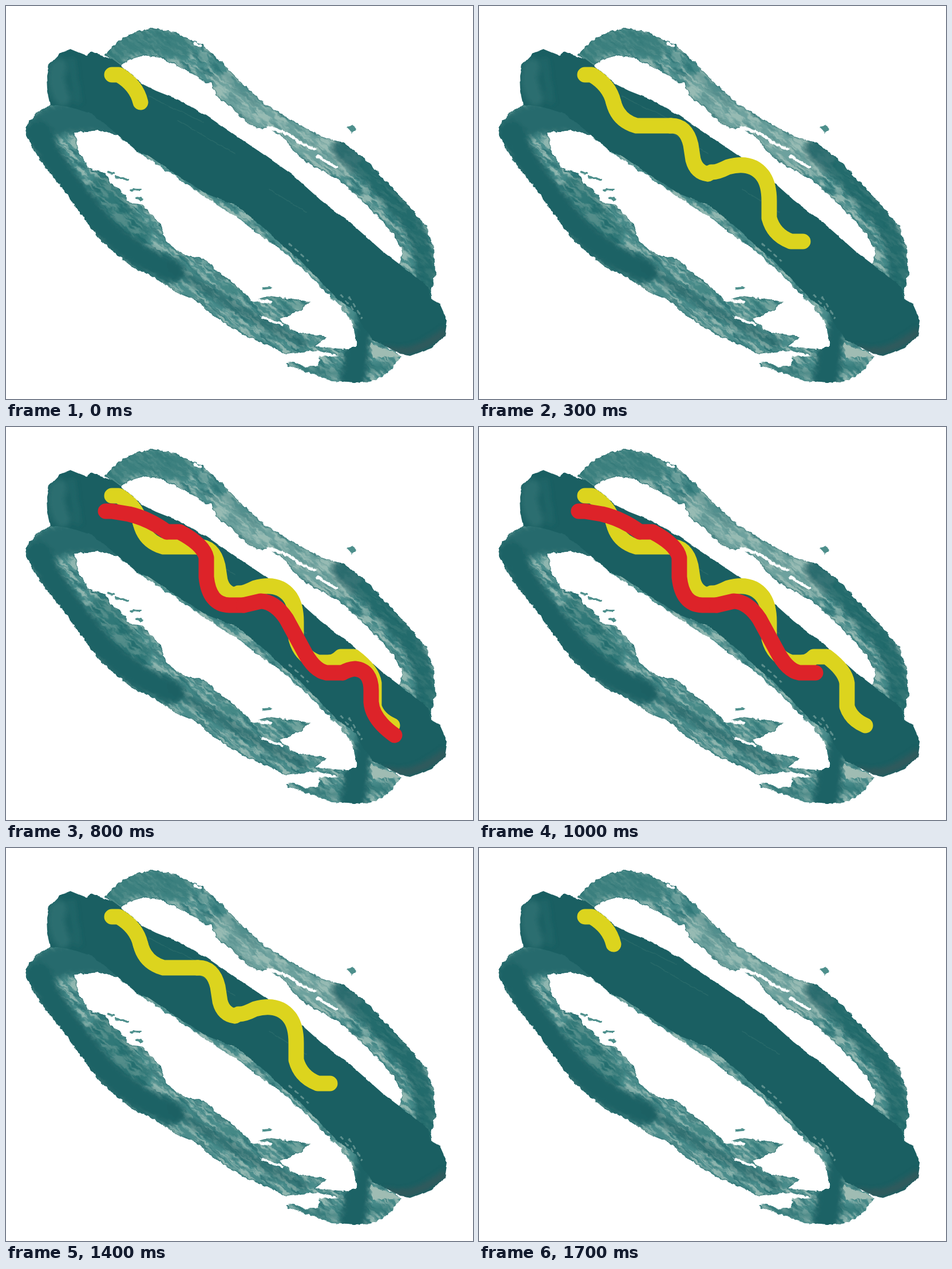
Animation, 816 px wide and 686 px high, one loop 1.8 s. Source, as an HTML page without scripts:

```html
<!DOCTYPE html>
<html lang="en">
<head>
<meta charset="utf-8">
<title>Hot dog</title>
<style>
@property --t { syntax: "<number>"; inherits: true; initial-value: 0; }
html, body { margin: 0; width: 100%; height: 100%; overflow: hidden; background: #fff; }
svg { position: absolute; left: 0; top: 0; width: 816px; height: 686px; }
.art { will-change: transform; }
.line { fill: none; stroke-linecap: round; stroke-linejoin: round; }
.sauce { stroke-width: 27; animation: tick 1.8s steps(18) infinite; }
/* the squeeze runs forward for nine ticks, then back */
.sauce path { opacity: calc(min(var(--t), 17 - var(--t)) - var(--k) + 1); }
@keyframes tick { from { --t: 0; } to { --t: 18; } }
</style>
</head>
<body>
<svg class="art" viewBox="0 0 816 686">
  <defs>
    <filter id="rough" filterUnits="userSpaceOnUse" x="0" y="0" width="816" height="686" color-interpolation-filters="sRGB">
      <feTurbulence type="fractalNoise" baseFrequency=".11" numOctaves="2" seed="4"/>
      <feColorMatrix values="1 0 0 0 0  0 1 0 0 0  0 0 1 0 0  0 0 0 0 1"/>
      <feDisplacementMap in="SourceGraphic" scale="7" xChannelSelector="R" yChannelSelector="G"/>
    </filter>
    <filter id="edge" filterUnits="userSpaceOnUse" x="0" y="0" width="816" height="686" color-interpolation-filters="sRGB">
      <feTurbulence type="fractalNoise" baseFrequency=".06" numOctaves="2" seed="9"/>
      <feColorMatrix values="1 0 0 0 0  0 1 0 0 0  0 0 1 0 0  0 0 0 0 1"/>
      <feDisplacementMap in="SourceGraphic" scale="4" xChannelSelector="R" yChannelSelector="G"/>
    </filter>
    <filter id="pale" x="0" y="0" width="1" height="1" color-interpolation-filters="sRGB">
      <feTurbulence type="fractalNoise" baseFrequency=".035 .16" numOctaves="3" seed="3"/>
      <feColorMatrix values="0 0 0 0 .64  0 0 0 0 .76  0 0 0 0 .73  5 0 0 0 -2.15"/>
    </filter>
    <filter id="deep" x="0" y="0" width="1" height="1" color-interpolation-filters="sRGB">
      <feTurbulence type="fractalNoise" baseFrequency=".03 .14" numOctaves="3" seed="17"/>
      <feColorMatrix values="0 0 0 0 .16  0 0 0 0 .44  0 0 0 0 .45  6 0 0 0 -3.2"/>
    </filter>
    <filter id="soft" filterUnits="userSpaceOnUse" x="0" y="0" width="816" height="686">
      <feGaussianBlur stdDeviation="5"/>
    </filter>

    <path id="top" d="M172 86L195 62 222 47 252 39 275 41 300 48 328 62 338 65 352 74 378 99 400 122 427 148 452 172 485 191 515 208 550 227 590 239 625 265 660 302 690 333 722 371 737 385 738 400 748 420 750 470 742 500 745 514 690 470 660 440 688 450 693 430 680 402 650 368 620 338 590 310 560 291 530 276 505 256 488 232 460 212 440 214 420 202 395 179 366 155 358 134 350 135 335 124 300 105 270 90 240 87 215 93 200 105Z"/>
    <path id="low" d="M84 171L55 184 38 204 33 222 50 255 75 290 100 320 130 361 160 403 190 430 220 455 260 475 300 501 330 513 370 546 420 576 460 593 490 607 515 604 545 602 590 612 600 600 540 594 562 577 525 572 500 566 478 546 515 531 530 517 490 510 458 506 430 515 402 488 370 463 345 441 320 437 300 428 280 411 271 382 255 366 238 347 215 343 200 321 182 310 174 292 145 284 125 250 120 221 160 217 200 226 215 200 130 165Z"/>
    <path id="foot" d="M488 624L505 621 522 630 545 628 548 612 590 610 600 598 613 594 612 540 640 550 650 586 692 612 668 640 640 655 612 658 570 655 530 640 505 632Z"/>
    <path id="rim" d="M195 225L232 256 268 279 300 300 340 328 380 354 410 373 440 397 480 426 520 460 550 490 585 525 606 554 613 592 650 580 600 470 400 320 230 220Z"/>
    <clipPath id="bun">
      <use href="#top"/><use href="#low"/><use href="#foot"/><use href="#rim"/>
    </clipPath>
    <path id="meat" d="M78 172L72 145 71 122 75 103 95 82 113 75 130 82 140 86 148 79 165 85 185 92 202 104 238 136 262 148 300 163 350 191 400 225 450 259 500 294 550 339 600 377 632 405 660 430 700 460 738 490 742 511 758 520 771 549 767 575 745 597 708 611 690 608 660 592 640 582 625 560 612 535 580 512 545 476 515 445 480 415 440 378 400 347 350 328 300 296 250 262 230 254 195 224 150 188 110 176Z"/>
    <clipPath id="inMeat"><use href="#meat"/></clipPath>
  </defs>

  <g filter="url(#rough)">
    <g clip-path="url(#bun)">
      <rect width="816" height="686" fill="#4b8d8c"/>
      <g transform="rotate(38)">
        <rect y="-500" width="1070" height="1040" filter="url(#pale)" opacity=".8"/>
        <rect y="-500" width="1070" height="1040" filter="url(#deep)" opacity=".7"/>
      </g>
      <g class="line" filter="url(#soft)" stroke="#1d6265">
        <path d="M385 145Q450 210 590 270" stroke="#a0c0b9" stroke-width="50" opacity=".4"/>
        <path d="M178 95Q205 58 262 60L305 72" stroke="#347b7a" stroke-width="42" opacity=".75"/>
        <path d="M330 75L430 160" stroke="#347b7a" stroke-width="12" opacity=".5"/>
        <path d="M588 250Q655 308 705 375Q738 425 735 505" stroke-width="36" opacity=".8"/>
        <path d="M215 205Q95 175 54 222" stroke="#256b6d" stroke-width="56"/>
        <path d="M58 222Q85 285 150 362Q205 432 290 462" stroke-width="44"/>
        <path d="M165 315L235 395" stroke-width="36" opacity=".5"/>
        <path d="M290 455Q400 530 520 590" stroke-width="18" opacity=".6"/>
        <path d="M380 490L520 525" stroke="#3d8380" stroke-width="14" opacity=".5"/>
        <path d="M510 630Q590 655 670 625" stroke="#2f7675" stroke-width="14" opacity=".7"/>
        <path d="M626 545L622 590" stroke-width="30"/>
        <path d="M614 600L606 655" stroke-width="44"/>
      </g>
      <g class="line" stroke="#1d6265" stroke-width="3" opacity=".4">
        <use href="#top"/><use href="#low"/>
      </g>
    </g>
    <path d="M636 588L692 611 640 614Z" fill="#9fbcb3"/>
    <path d="M596 211L603 209 610 211 611 216 605 223 602 217Z" fill="#4d8f8c"/>
    <g class="line" stroke="#fff" stroke-width="5">
      <path d="M458 211L490 222 512 238 540 250M545 262L578 282M330 66L338 69M430 513L462 517M448 543L482 556"/>
    </g>
    <path d="M180 290L188 291M192 298L212 304M218 322L234 321M228 335L238 337M450 493L462 492" class="line" stroke="#4d8f8c" stroke-width="4"/>
  </g>

  <g filter="url(#edge)">
    <use href="#meat" fill="#1a5f62"/>
    <g clip-path="url(#inMeat)">
      <g class="line" filter="url(#soft)">
        <path d="M92 105Q82 130 98 160" stroke="#317576" stroke-width="30" opacity=".75"/>
        <path d="M115 95L125 165" stroke="#2a6d6e" stroke-width="10" opacity=".6"/>
        <path d="M665 600Q708 614 765 570" stroke="#40575a" stroke-width="12" opacity=".7"/>
      </g>
      <path d="M250 158L345 203M300 200L400 258M460 320L525 360" class="line" stroke="#31706f" stroke-width="1.5" opacity=".6"/>
    </g>
    <path d="M495 415L528 445M585 505L612 535M600 508L622 545" class="line" stroke="#8bb0aa" stroke-width="3" stroke-dasharray="5 9" opacity=".6"/>
  </g>
</svg>

<svg class="line sauce" viewBox="0 0 816 686">
  <g stroke="#dcd41e">
    <path style="--k:0" d="M185 120H197Q228 138 235 168"/>
    <path style="--k:1" d="M235 168Q243 200 275 209H335"/>
    <path style="--k:2" d="M335 209Q362 208 370 242L374 268Q380 291 400 293"/>
    <path style="--k:3" d="M400 293L406 290Q415 291 435 281Q475 270 495 295Q507 310 507 340V370Q515 400 545 411H566"/>
    <path style="--k:4" d="M566 411Q576 410 585 401H608Q640 425 643 447V488Q650 510 675 521"/>
  </g>
  <g stroke="#dd2329">
    <path style="--k:5" d="M174 147H185L215 152Q250 160 281 183"/>
    <path style="--k:6" d="M281 183H303Q345 205 350 228V262Q355 310 390 311H415"/>
    <path style="--k:7" d="M415 311L445 304Q470 305 490 335L520 390Q538 425 560 429H588"/>
    <path style="--k:8" d="M588 429Q598 423 610 422Q638 425 638 460V480Q640 510 679 538"/>
  </g>
</svg>
</body>
</html>
```
